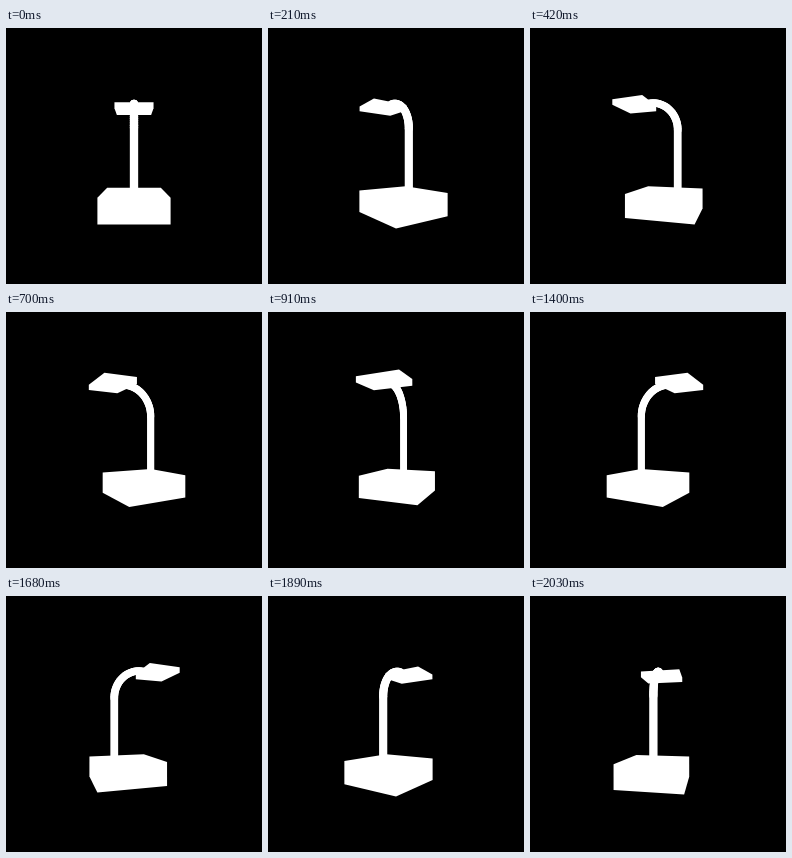
These frames come from a looping animation (256 px wide and 256 px high, 2100 ms). An HTML page with a canvas:

```html
<!DOCTYPE html>
<html lang="en">
<head>
<meta charset="utf-8">
<title>Turning desk lamp</title>
<style>
  html, body { margin: 0; width: 100%; height: 100%; overflow: hidden; background: #000; }
  canvas { display: block; width: 256px; height: 256px; }
</style>
</head>
<body>
<canvas id="stage" width="256" height="256"></canvas>
<script>
const ctx = document.getElementById('stage').getContext('2d');

const STEP_MS = 70, STEPS = 30;
const FOCAL = 212, CENTER_X = 128, HORIZON = 132;

// Lamp sizes, in units of the camera distance; y points down.
const BASE = { half: 0.1395, near: -0.192, far: 0.102, top: [0.144, 0.144], bottom: [0.246, 0.246] };
const HEAD = { half: 0.096, near: 0.041, far: 0.188, top: [-0.283, -0.277], bottom: [-0.254, -0.252] };
const TUBE = { radius: 0.0178, foot: 0.15, back: -0.095, bend: 0.134, top: -0.272 };

// Turns a point about the vertical axis and projects it.
function project(u, y, v, angle) {
  const c = Math.cos(angle), s = Math.sin(angle);
  const scale = FOCAL / (1 + u * s + v * c);
  return { x: CENTER_X + (u * c - v * s) * scale, y: HORIZON + y * scale, scale };
}

function corners(box, angle) {
  const points = [];
  [box.near, box.far].forEach((v, end) => {
    for (const u of [-box.half, box.half])
      for (const y of [box.top[end], box.bottom[end]])
        points.push(project(u, y, v, angle));
  });
  return points;
}

function hull(points) {
  const sorted = points.slice().sort((a, b) => a.x - b.x || a.y - b.y);
  const cross = (o, a, b) => (a.x - o.x) * (b.y - o.y) - (a.y - o.y) * (b.x - o.x);
  const half = list => {
    const out = [];
    for (const p of list) {
      while (out.length > 1 && cross(out[out.length - 2], out[out.length - 1], p) <= 0) out.pop();
      out.push(p);
    }
    return out.slice(0, -1);
  };
  return half(sorted).concat(half(sorted.reverse()));
}

function drawBox(box, angle) {
  ctx.beginPath();
  for (const p of hull(corners(box, angle))) ctx.lineTo(p.x, p.y);
  ctx.fill();
}

function drawTube(angle) {
  const { radius, foot, back, bend, top } = TUBE;
  const path = [project(0, foot, back, angle)];
  for (let i = 0; i <= 20; i++) {
    const a = i / 20 * Math.PI / 2;
    path.push(project(0, top + bend * (1 - Math.sin(a)), back + bend * (1 - Math.cos(a)), angle));
  }
  ctx.lineCap = 'round';
  for (let i = 1; i < path.length; i++) {
    const a = path[i - 1], b = path[i];
    ctx.lineWidth = radius * (a.scale + b.scale);
    ctx.beginPath();
    ctx.moveTo(a.x, a.y);
    ctx.lineTo(b.x, b.y);
    ctx.stroke();
  }
}

function draw(step) {
  const angle = step / STEPS * Math.PI * 2;
  ctx.fillStyle = '#000';
  ctx.fillRect(0, 0, 256, 256);
  ctx.fillStyle = ctx.strokeStyle = '#fff';
  drawBox(BASE, angle);
  drawTube(angle);
  drawBox(HEAD, angle);
}

const start = performance.now();
let shown = -1;

function tick() {
  const step = Math.floor((performance.now() - start) / STEP_MS) % STEPS;
  if (step !== shown) draw(shown = step);
  requestAnimationFrame(tick);
}
tick();
</script>
</body>
</html>
```
